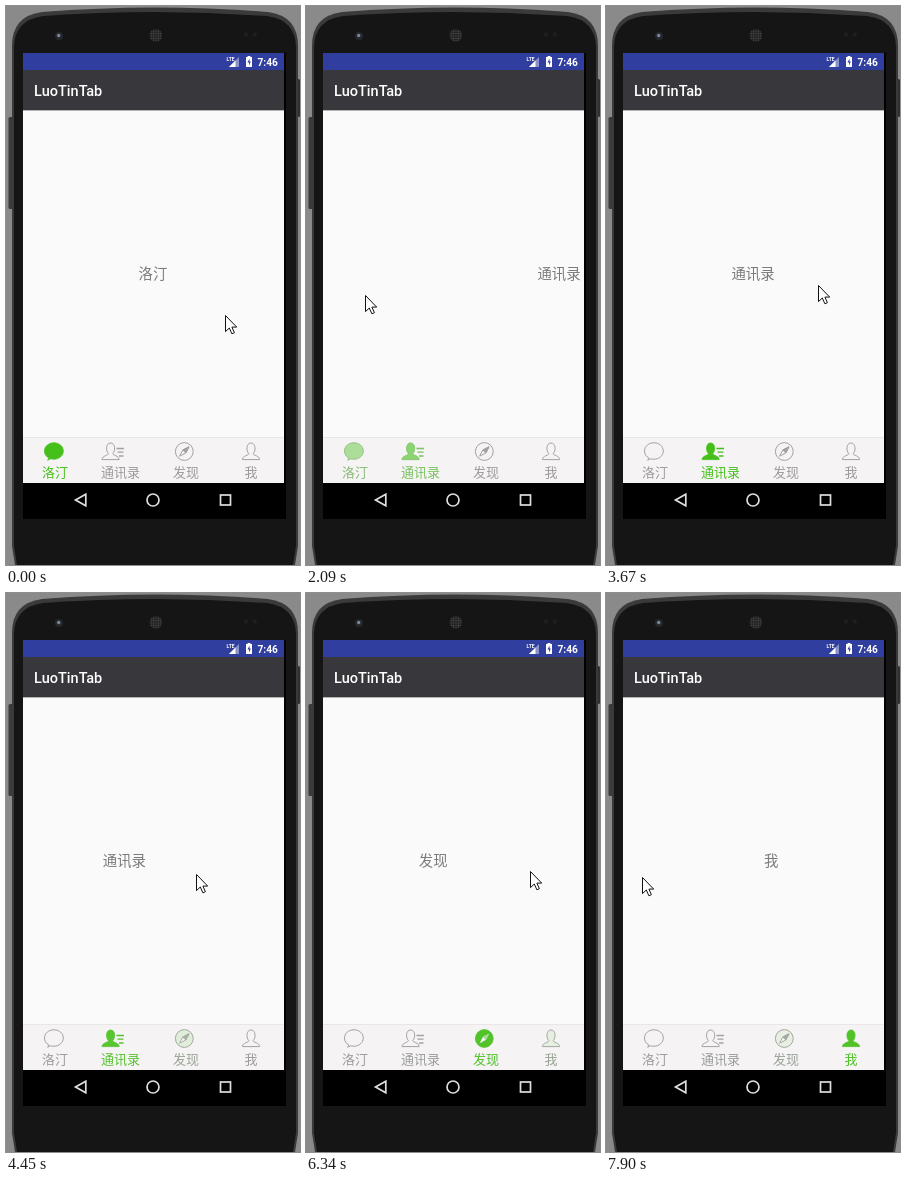
Recreate the animation shown at these times as an HTML page. Size 294 by 559 pixels, loop 8 s.

```html
<!DOCTYPE html>
<html lang="zh">
<head>
<meta charset="utf-8">
<title>LuoTinTab</title>
<style>
  html, body { margin: 0; width: 100%; height: 100%; overflow: hidden; background: #8a8a8a; }
  svg { display: block; width: 294px; height: 559px; }
  text { font-family: "Noto Sans CJK SC", "Noto Sans CJK", sans-serif; }
  .roboto { font-family: Roboto, sans-serif; fill: #fff; }
  .page { font-size: 14.4px; fill: #7b7b7b; text-anchor: middle; }
  .tab text { font-size: 13px; text-anchor: middle; stroke: none; }
  .off { fill: none; stroke: #a2a2a2; }
  .off text { fill: #9b9b9b; }
  .off .half { fill: #a2a2a2; }
  .on { fill: #45c01a; stroke: #45c01a; stroke-width: .8; }
  .on .needle { fill: #f5f3f4; stroke: none; }
  .on .half { fill: #a5dc90; stroke: none; }
  .nav { fill: none; stroke: #dedede; stroke-width: 1.7; }
</style>
</head>
<body>
<svg viewBox="0 0 294 559">
  <defs>
    <clipPath id="view"><rect x="17" y="104" width="261" height="327"/></clipPath>
    <pattern id="mesh" width="2.4" height="2.4" patternUnits="userSpaceOnUse">
      <rect width="2.4" height="2.4" fill="#1c1c1c"/>
      <circle cx="1.2" cy="1.2" r=".8" fill="#505050"/>
    </pattern>
    <path id="person" d="M-2.2 447.5C-5 445-4.9 437 0 437S5 445 2.2 447.5C2 449.6 8.4 449.4 8.6 453.6H-8.6C-8.4 449.4-2 449.6-2.2 447.5Z"/>
    <g id="chat"><path d="M43 452.1C40 450.6 38.5 448 38.5 445C38.5 440.4 42.6 436.8 47.9 436.8S57.3 440.4 57.3 445S53.2 453.2 47.9 453.2C46.7 453.2 45.6 453 44.7 452.8L41.6 454.2Z"/></g>
    <g id="book"><use href="#person" x="104.6"/><path d="M110.5 442.5H118M111.5 446.2H117.5M113 450H117.5" stroke-width="1.3"/></g>
    <g id="compass"><circle cx="178.300" cy="445.5" r="8.9"/><path class="needle" d="M183 440.8L179.8 447L173.6 450.2L176.8 444Z"/><path class="half" d="M183 440.8L179.8 447L176.8 444Z"/></g>
    <g id="me"><use href="#person" x="245"/></g>
  </defs>

  <!-- phone -->
  <rect x="2.5" y="111" width="5" height="92" rx="1.5" fill="#3b3b3b"/>
  <rect x="289" y="73" width="5" height="38" rx="1.5" fill="#303030"/>
  <path d="M6 40Q6 10 36 6Q149-3 262 6Q292 10 292 40V540L289 559H9L6 540Z" fill="#3a3a3a"/>
  <path d="M8 42Q8 14 37 10Q149 2 261 10Q290 14 290 42V540L287 559H11L8 540Z" fill="#151515"/>
  <circle cx="53" cy="30" r="4" fill="#25272b"/>
  <circle cx="52.7" cy="29.5" r="1.7" fill="#7d86a0"/>
  <circle cx="149.8" cy="29.3" r="6.3" fill="url(#mesh)"/>
  <circle cx="240" cy="28.5" r="2.2" fill="#1e1e1e"/>
  <circle cx="249" cy="28.5" r="2.2" fill="#1e1e1e"/>

  <!-- screen -->
  <rect x="17" y="47" width="263" height="466" fill="#000"/>
  <rect x="17" y="47" width="261" height="17" fill="#303f9f"/>
  <rect x="17" y="64" width="261" height="40" fill="#38373c"/>
  <rect x="17" y="104" width="261" height="327" fill="#fafafa"/>
  <path d="M17 104.5H278" stroke="#b4b4b4"/>
  <rect x="17" y="431" width="261" height="46" fill="#f5f3f4"/>
  <path d="M17 431.5H278" stroke="#e8e6e7"/>
  <text class="roboto" x="220.5" y="54.5" font-size="5" font-weight="700">LTE</text>
  <path d="M233 51V61H223Z" fill="#8a93c9"/>
  <path d="M229.5 54.5V61H223Z" fill="#fff"/>
  <path d="M240 51H241.6V50H244.4V51H246V61H240Z" fill="#fff"/>
  <path d="M243.5 52.5L241.5 56.5H243V59.5L244.8 55.5H243.5Z" fill="#303f9f"/>
  <text class="roboto" x="251.5" y="59.5" font-size="10.2" font-weight="700">7:46</text>
  <text class="roboto" x="28" y="90" font-size="14.5" font-weight="500">LuoTinTab</text>

  <g clip-path="url(#view)"><g id="pages"></g></g>
  <g id="tabs"></g>

  <g class="nav">
    <path d="M69.5 494L79.8 488.2V499.8Z"/>
    <circle cx="147" cy="494" r="6"/>
    <rect x="214.5" y="489" width="10" height="10"/>
  </g>
  <path id="cursor" d="M.5 .5V16.6L4.3 13L6.9 18.8L9.4 17.7L6.9 12.1H11.7Z" fill="#fff" stroke="#111"/>
</svg>
<script>
  const LOOP = 8000, TICK = 135.6, WIDTH = 261;
  const SLOP = 16, DRAG = 0.963, SETTLE = 2.4;
  const $ = id => document.getElementById(id);

  const tabs = [
    { name: '洛汀', icon: 'chat', x: 49 },
    { name: '通讯录', icon: 'book', x: 114.5 },
    { name: '发现', icon: 'compass', x: 180 },
    { name: '我', icon: 'me', x: 245 }
  ];
  // Icons are cloned inline so that the on/off styles reach their parts.
  const layer = (tab, cls) =>
    `<g class="${cls}">${$(tab.icon).innerHTML}<text x="${tab.x}" y="470.8">${tab.name}</text></g>`;
  $('tabs').innerHTML = tabs.map(t => `<g class="tab">${layer(t, 'off')}${layer(t, 'on')}</g>`).join('');
  $('pages').innerHTML = tabs.map((t, i) =>
    `<text class="page" x="${147 + i * WIDTH}" y="273.4">${t.name}</text>`).join('');
  const offs = document.querySelectorAll('.off'), ons = document.querySelectorAll('.on');

  // Mouse turning points, times in screen updates
  const mouse = [
    { t: 0, x: 219, y: 309 },
    { t: 3, x: 236, y: 301 },
    { t: 4.4, x: 236, y: 301, press: true },
    { t: 18, x: 9, y: 286 },
    { t: 21, x: 242, y: 280 },
    { t: 23, x: 283, y: 278 },
    { t: 27, x: 212, y: 279 },
    { t: 28, x: 236, y: 281 },
    { t: 30.3, x: 236, y: 281, press: true },
    { t: 42, x: 38, y: 281 },
    { t: 45, x: 261, y: 277, press: true },
    { t: 57.2, x: 38, y: 284 },
    { t: 59, x: 34, y: 284 }
  ];
  // Each swipe lasts from a press to the next turning point.
  const swipes = mouse.flatMap((p, i) => p.press ? [{ from: p, to: mouse[i + 1] }] : []);

  function pointer(t) {
    const i = mouse.findIndex(p => p.t > t);
    const a = mouse[i - 1], b = mouse[i], u = (t - a.t) / (b.t - a.t);
    return { x: a.x + (b.x - a.x) * u, y: a.y + (b.y - a.y) * u };
  }

  // The page follows the finger past the slop, then eases to the next stop.
  function swiped({ from, to }, t) {
    if (t <= from.t) return 0;
    const x = pointer(Math.min(t, to.t - 1e-6)).x;
    const dragged = Math.max(0, from.x - SLOP - x) * DRAG;
    const left = 1 - Math.min(1, Math.max(0, t - to.t) / SETTLE);
    return WIDTH - (WIDTH - dragged) * left ** 3;
  }

  function draw(ms) {
    const t = Math.min(58, Math.floor(ms % LOOP / TICK + 0.25));
    const scroll = swipes.reduce((sum, s) => sum + swiped(s, t), 0);
    const { x, y } = pointer(t);
    $('pages').setAttribute('transform', `translate(${-scroll} 0)`);
    tabs.forEach((_, i) => {
      const p = Math.max(0, 1 - Math.abs(scroll / WIDTH - i));
      offs[i].style.opacity = 1 - p;
      ons[i].style.opacity = p;
    });
    $('cursor').setAttribute('transform', `translate(${Math.round(x)} ${Math.round(y)})`);
  }

  let begin;
  function tick(now) {
    begin ??= now;
    draw(now - begin);
    requestAnimationFrame(tick);
  }
  draw(0);
  requestAnimationFrame(tick);
</script>
</body>
</html>
```
